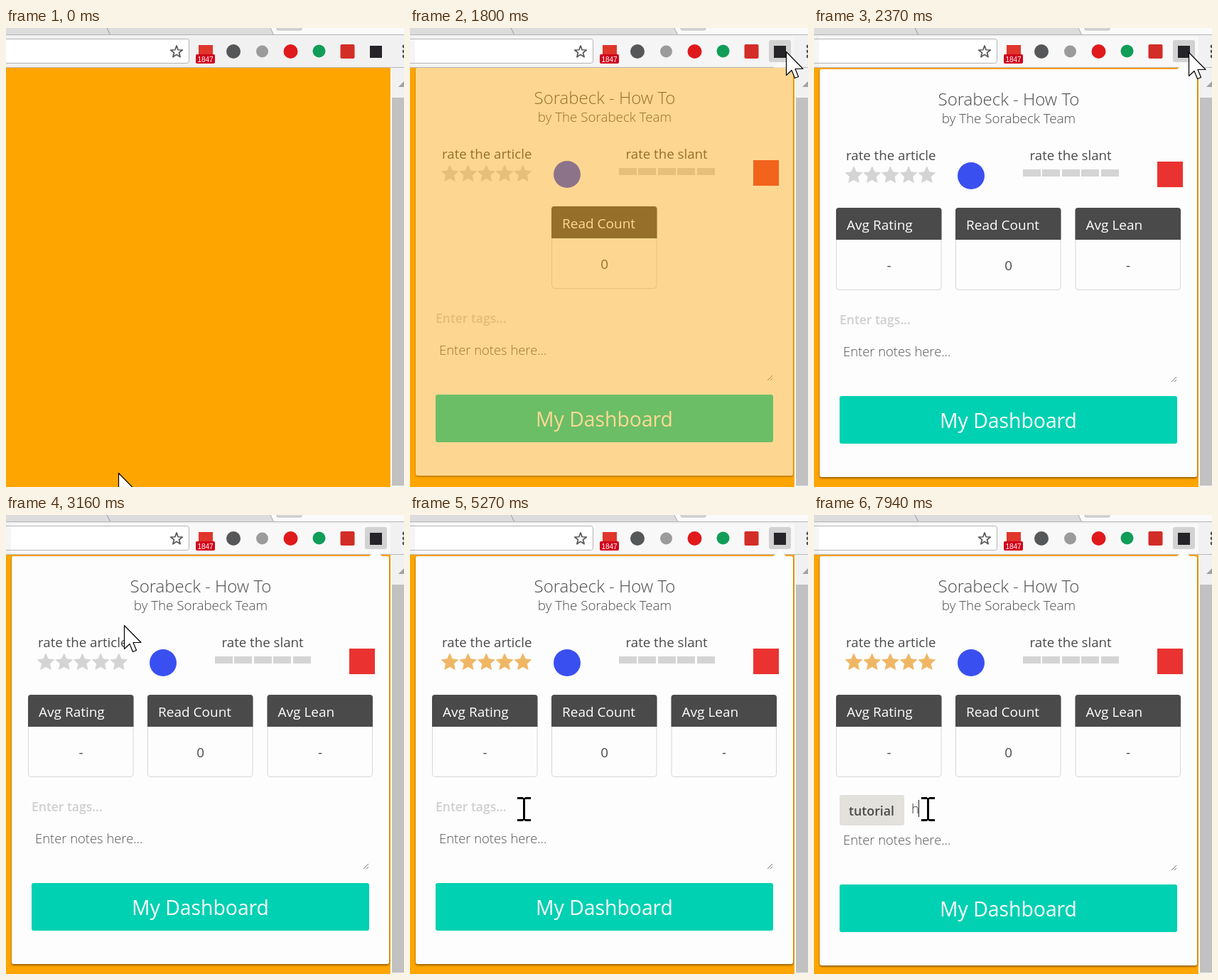
These frames come from a looping animation (560 by 646 pixels, 8 s). An HTML page with a canvas:

```html
<!DOCTYPE html>
<html lang="en">
<head>
<meta charset="utf-8">
<title>Rating popup</title>
<style>
html, body { margin: 0; width: 100%; height: 100%; overflow: hidden; }
canvas { display: block; width: 560px; height: 646px; }
</style>
</head>
<body>
<canvas id="stage" width="560" height="646"></canvas>
<script>
const stage = document.getElementById('stage').getContext('2d');
const layer = Object.assign(document.createElement('canvas'), { width: 560, height: 646 })
  .getContext('2d');
let ctx = stage;
const LOOP = 8000;
const SANS = '"Open Sans", "Noto Sans", sans-serif';
const INK = '#4a4a4a', GREY = '#d4d4d4';

const clamp = v => Math.max(0, Math.min(1, v));

function rect(x, y, w, h, color) {
  ctx.fillStyle = color;
  ctx.fillRect(x, y, w, h);
}

function box(x, y, w, h, r, fill, stroke) {
  ctx.beginPath();
  ctx.roundRect(x, y, w, h, r);
  if (fill) { ctx.fillStyle = fill; ctx.fill(); }
  if (stroke) { ctx.strokeStyle = stroke; ctx.lineWidth = 1; ctx.stroke(); }
}

function circle(x, y, r, color) {
  ctx.beginPath();
  ctx.arc(x, y, r, 0, Math.PI * 2);
  ctx.fillStyle = color;
  ctx.fill();
}

function poly(points, fill, stroke, width = 1) {
  ctx.beginPath();
  points.forEach(([x, y]) => ctx.lineTo(x, y));
  ctx.closePath();
  ctx.lineWidth = width;
  ctx.lineJoin = 'round';
  if (fill) { ctx.fillStyle = fill; ctx.fill(); }
  if (stroke) { ctx.strokeStyle = stroke; ctx.stroke(); }
}

function line(x1, y1, x2, y2, color, width = 1) {
  ctx.beginPath();
  ctx.moveTo(x1, y1);
  ctx.lineTo(x2, y2);
  ctx.strokeStyle = color;
  ctx.lineWidth = width;
  ctx.stroke();
}

function text(str, x, y, size, { weight = 400, color = INK, align = 'left' } = {}) {
  ctx.font = `${weight} ${size}px ${SANS}`;
  ctx.fillStyle = color;
  ctx.textAlign = align;
  ctx.fillText(str, x, y);
}

function star(cx, cy, r, ratio) {
  return Array.from({ length: 10 }, (_, i) => {
    const a = (i / 5 - 0.5) * Math.PI, d = i % 2 ? r * ratio : r;
    return [cx + d * Math.cos(a), cy + d * Math.sin(a)];
  });
}

// Pointer path as [time, x, y]; repeated places are rests.
const PATH = [
  [0, 158, 626], [540, 158, 626], [670, 225, 585], [770, 312, 525], [850, 350, 410],
  [910, 378, 320], [970, 409, 240], [1030, 432, 178], [1110, 480, 112],
  [1240, 529, 33], [2340, 529, 33], [2640, 420, 75], [2900, 262, 128],
  [3160, 166, 155], [3370, 112, 182], [3600, 60, 204], [3950, 99, 207],
  [4250, 133, 209], [4580, 157, 210], [4800, 157, 210], [4940, 160, 285],
  [5060, 177, 360], [5150, 176, 402], [5270, 160, 414], [LOOP, 160, 414]
];

function slope(i, axis) {
  const a = PATH[i - 1], b = PATH[i], c = PATH[i + 1];
  const rests = (p, q) => p[1] === q[1] && p[2] === q[2];
  if (!a || !c || rests(a, b) || rests(b, c)) return 0;
  return (c[axis] - a[axis]) / (c[0] - a[0]);
}

function pointerAt(t) {
  const i = Math.max(0, PATH.findIndex(p => p[0] > t) - 1);
  const a = PATH[i], b = PATH[i + 1], span = b[0] - a[0], u = (t - a[0]) / span;
  return [1, 2].map(k => {
    const v = 1 - u;
    return a[k] * v * v * (1 + 2 * u) + b[k] * u * u * (3 - 2 * u)
      + span * u * v * (slope(i, k) * v - slope(i + 1, k) * u);
  });
}

function arrowPointer() {
  poly([[.5, .5], [.5, 33.5], [8, 26.5], [12.5, 37.5], [17.5, 35.5], [13, 24.5], [24, 24.5]],
    '#fff', '#000', 1.2);
}

function handPointer() {
  ctx.beginPath();
  ctx.moveTo(-3, 4);
  ctx.bezierCurveTo(-3, -1, 4, -1, 4, 4);
  ctx.lineTo(4, 17);
  ctx.bezierCurveTo(5, 13, 10, 14, 10, 18);
  ctx.bezierCurveTo(11, 15, 15, 16, 15.5, 20);
  ctx.bezierCurveTo(17, 17, 20, 19, 20, 22);
  ctx.lineTo(20, 32);
  ctx.bezierCurveTo(20, 37, 16, 38, 16, 44.5);
  ctx.lineTo(-2, 44.5);
  ctx.bezierCurveTo(-2, 38, -8, 34, -12, 25);
  ctx.bezierCurveTo(-14, 20, -8, 18, -6, 23);
  ctx.lineTo(-3, 27);
  ctx.closePath();
  ctx.fillStyle = '#fff';
  ctx.fill();
  ctx.strokeStyle = '#000';
  ctx.lineWidth = 1.6;
  ctx.lineJoin = 'round';
  ctx.stroke();
  line(4, 16, 4, 25, '#000', 1.5);
  line(10, 18, 10, 25, '#000', 1.5);
  line(15.5, 20, 15.5, 26, '#000', 1.5);
}

function beamPointer() {
  rect(-1, -16, 3, 32, '#000');
  for (const y of [-17, 14]) {
    rect(-9, y, 8, 3, '#000');
    rect(2, y, 8, 3, '#000');
  }
}

function drawPointer(t, [x, y]) {
  ctx.save();
  ctx.translate(Math.round(x), Math.round(y));
  if (t > 5000 && y > 392) beamPointer();
  else if (t > 3160 && y > 193 && y < 222) handPointer();
  else arrowPointer();
  ctx.restore();
}

function drawBrowser(t, shown) {
  rect(0, 0, 560, 646, '#ffa500');

  rect(0, 0, 560, 10, '#fafafa');
  poly([[0, 0], [372, 0], [377, 10], [0, 10]], '#dcdcdc');
  line(142, 0, 146.5, 9, '#999');
  line(372, 0, 376.5, 9, '#aaa');
  box(381, -4, 35, 7, 2, '#d4d4d4', '#bdbdbd');
  rect(0, 9, 560, 1, '#b4b4b4');

  rect(0, 10, 560, 45, '#f1f1f1');
  if (shown) rect(7, 12, 534, 43, `rgba(255,255,255,${0.5 * shown})`);
  rect(0, 55, 560, 1, '#b9b9b9');
  box(-9.5, 15.5, 267, 34, 3, '#fff', '#b3b3b3');
  if (shown) rect(0, 16, 7, 33, '#f5f5f5');
  poly(star(240, 33.7, 8.7, .42), null, '#555', 1.7);

  rect(271, 24, 20, 13, '#e0362c');
  box(267, 37, 27, 13, 2, '#d0021b');
  ctx.font = '10px "Liberation Sans", Arial, sans-serif';
  ctx.fillStyle = '#fff';
  ctx.textAlign = 'center';
  ctx.fillText('1847', 280.5, 47.5);
  circle(320, 33, 10, '#555759');
  circle(360.5, 33, 8.5, '#9b9b9b');
  circle(400.5, 33, 10, '#e0191c');
  circle(440.5, 32.5, 9, '#0f9d58');
  box(470.5, 23, 20, 20, 2, '#d32d27');

  if (shown) box(505, 17, 31, 31, 3, '#d2d2d2');
  else if (t >= 1520) {
    ctx.globalAlpha = clamp((t - 1500) / 150);
    box(501, 14, 39, 38, 16, '#d4d4d4');
    ctx.globalAlpha = 1;
  }
  rect(512, 25, 17, 17, '#262329');
  for (const y of [26, 33, 40]) circle(560, y, 2.4, '#555');

  rect(541, 56, 19, 590, '#f1f1f1');
  rect(541, 56, 2, 590, '#fff');
  rect(543, 98, 17, 546, '#c1c1c1');
  poly([[552, 83], [560, 75], [560, 83]], '#a3a3a3');
}

function drawCard(x, label, value) {
  box(x + .5, 253.5, 147.5, 115, 4, null, '#d6d6d6');
  box(x, 253, 148.5, 45, [4, 4, 0, 0], '#4a4a4a');
  text(label, x + 15, 284, 19, { color: '#fff' });
  text(value, x + 74.5, 341, 18.8, { align: 'center' });
}

const KEYS = [[6390, 't'], [6640, 'u'], [6790, 't'], [6900, 'o'], [7000, 'r'],
  [7150, 'i'], [7210, 'a'], [7370, 'l']];
const TAG_TIME = 7450;

function caret(x) {
  rect(Math.round(x), 401, 1, 24, '#222');
}

function drawTagField(t) {
  const light = { weight: 300, color: '#333' };
  if (t >= TAG_TIME) {
    box(36, 394, 91, 43, 3, '#e3e1dc');
    text('tutorial', 49, 423, 17.8, { weight: 600 });
    const typed = t >= 7940 ? 'h' : '';
    text(typed, 137, 420, 18.7, light);
    caret(137 + ctx.measureText(typed).width - (typed ? 1 : 0));
    return;
  }
  if (t < 5730) text('Enter tags...', 36, 417, 17.5, { weight: 600, color: '#cfcfcf' });
  const typed = KEYS.filter(k => t >= k[0]).map(k => k[1]).join('');
  text(typed, 36, 418, 18.7, light);
  if (t >= 5640 && (t < 6180 || typed)) caret(36 + ctx.measureText(typed).width);
}

function litStars(t, [x, y]) {
  if (t >= 4500) return 5;
  if (t < 3160 || y < 194) return 0;
  return Math.max(1, Math.min(5, Math.floor((x - 43) / 25.7) + 1));
}

function drawPopup(t, pointer) {
  const grow = t >= TAG_TIME ? 2 : 0;
  ctx.save();

  ctx.save();
  ctx.shadowColor = 'rgba(0,0,0,.5)';
  ctx.shadowBlur = 3;
  ctx.shadowOffsetY = 1.5;
  box(8, 58, 531, 574 + grow, 3, '#fdfdfd');
  ctx.restore();
  poly([[511, 58], [520, 49], [529, 58]], '#fdfdfd');

  text('Sorabeck - How To', 274, 109, 24, { weight: 300, align: 'center' });
  text('by The Sorabeck Team', 274, 134, 18.8, { weight: 300, align: 'center' });
  text('rate the article', 45, 186, 18.7);
  text('rate the slant', 303.5, 186, 18.7);

  const lit = litStars(t, pointer);
  for (let i = 0; i < 5; i++) {
    const color = i < lit ? '#efb765' : GREY;
    poly(star(56 + i * 25.7, 207.5, 12.4, .48), color, color, .8);
    rect(294 + Math.round(i * 27.4), 199, 25, 10, GREY);
  }
  circle(221, 208, 19, '#3a4ff0');
  rect(483, 188, 36, 36, '#ea3331');

  if (t >= 1830) {
    drawCard(31, 'Avg Rating', '-');
    drawCard(367.5, 'Avg Lean', '-');
  }
  drawCard(199, 'Read Count', '0');

  drawTagField(t);

  ctx.translate(0, grow);
  text('Enter notes here...', 41, 462, 18.4, { weight: 300, color: '#555' });
  line(503, 498, 510, 491, '#777');
  line(507, 498, 510, 495, '#777');
  box(36, 518, 475, 67, 3, '#00d1b2');
  text('My Dashboard', 273.5, 563, 28.3, { color: '#fff', align: 'center' });
  ctx.restore();
}

// The popup is painted on its own layer so that it fades as one sheet.
function fadePopup(t, shown, pointer) {
  ctx = layer;
  ctx.clearRect(0, 0, 560, 646);
  drawPopup(t, pointer);
  ctx = stage;
  ctx.globalAlpha = shown;
  ctx.drawImage(layer.canvas, 0, -Math.round((1 - shown) * 4.5));
  ctx.globalAlpha = 1;
}

function draw(t) {
  const shown = clamp((t - 1700) / 175);
  const pointer = pointerAt(t);
  drawBrowser(t, shown);
  if (shown) fadePopup(t, shown, pointer);
  drawPointer(t, pointer);
}

const start = performance.now();
function frame() {
  draw((performance.now() - start) % LOOP);
  requestAnimationFrame(frame);
}
frame();
</script>
</body>
</html>
```
